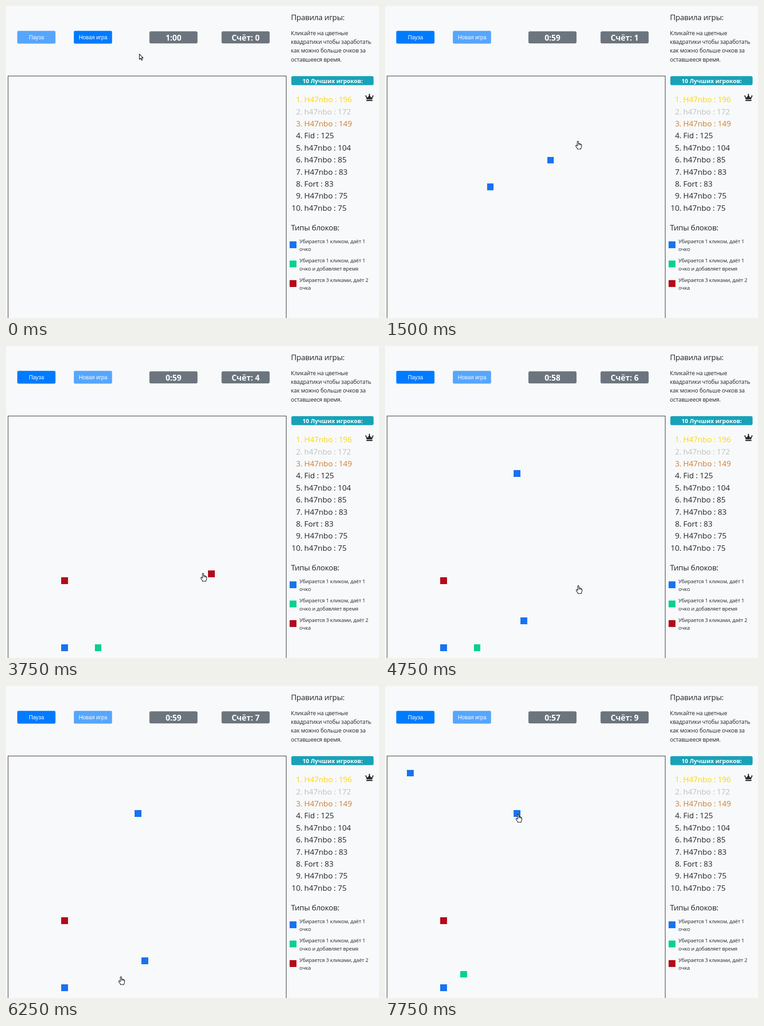
Recreate the animation shown at these times as an HTML page. Size 818x684 px, loop 8 s.

```html
<!DOCTYPE html>
<html lang="ru">
<head>
<meta charset="utf-8">
<title>Цветные квадратики</title>
<style>
  html, body { margin: 0; width: 100%; height: 100%; overflow: hidden; background: #f8f9fa; }
  svg { display: block; width: 818px; height: 684px; }
  text { font-family: "Open Sans", "Noto Sans", sans-serif; fill: #212529; white-space: pre; }
  .head { font-size: 16.8px; letter-spacing: -.015em; }
  .rules { font-size: 12.35px; letter-spacing: -.015em; }
  .note { font-size: 11.25px; letter-spacing: -.015em; }
  .rank { font-size: 17px; letter-spacing: -.005em; }
  .end { text-anchor: end; }
  .badge, .title { font-weight: 700; fill: #fff; text-anchor: middle; }
  .badge { font-size: 17.4px; }
  .title { font-size: 12.6px; }
  .btn { font: 12px "Liberation Sans", Arial, sans-serif; fill: #fff; text-anchor: middle; }
</style>
</head>
<body>
<svg id="stage" viewBox="0 0 818 684"></svg>
<script>
const LOOP = 8000, STEP = 250;
const BLUE = '#1872f0', GREEN = '#05d090', RED = '#b30a1b';
const stage = document.getElementById('stage');

function add(tag, attrs, parent = stage) {
  const el = document.createElementNS('http://www.w3.org/2000/svg', tag);
  for (const key in attrs) el.setAttribute(key, attrs[key]);
  return parent.appendChild(el);
}
function rect(x, y, width, height, fill, rx = 0, parent = stage) {
  return add('rect', { x, y, width, height, fill, rx }, parent);
}
function label(x, y, cls, str, parent = stage) {
  const el = add('text', { x, y, class: cls }, parent);
  el.textContent = str;
  return el;
}
function button(x, str) {
  const g = add('g');
  rect(x, 54.6, 83.8, 28, '#007bff', 3, g);
  label(x + 42.1, 72.6, 'btn', str, g);
  return g;
}
function badge(x) {
  rect(x, 55.5, 105.5, 26.5, '#6c757d', 3.5);
  return label(x + 52.8, 76, 'badge', '');
}

// Controls
const ring = rect(146.3, 52.2, 88.6, 32.8, 'rgba(0,123,255,.5)', 5);
rect(148.8, 54.6, 83.8, 28, '#f8f9fa', 3);
const pause = button(24.7, 'Пауза');
const start = button(148.8, 'Новая игра');
const timer = badge(314.5);
const score = badge(472.7);

// Side panel
label(625, 31, 'head', 'Правила игры:');
['Кликайте на цветные', 'квадратики чтобы заработать', 'как можно больше очков за', 'оставшееся время.']
  .forEach((line, i) => label(624.8, 63.6 + i * 19.4, 'rules', line));

rect(625.7, 153.8, 180.4, 19.6, '#17a2b8', 3.5);
label(716.3, 168.7, 'title', '10 Лучших игроков:');

const medals = ['#ffd700', '#c0c0c0', '#cd7f32'];
['H47nbo : 196', 'h47nbo : 172', 'H47nbo : 149', 'Fid : 125', 'h47nbo : 104',
 'h47nbo : 85', 'H47nbo : 83', 'Fort : 83', 'H47nbo : 75', 'h47nbo : 75'].forEach((line, i) => {
  const y = 211.4 + i * 26.35;
  const parts = [label(650, y, 'rank end', i + 1 + '.'), label(654, y, 'rank', line)];
  if (medals[i]) parts.forEach(el => el.style.fill = medals[i]);
});

const crown = add('g', { fill: '#212529' });
add('path', { d: 'M791 204.5 788.8 197.5 793.6 200.8 797 193.5 800.4 200.8 805.2 197.5 803 204.5Z' }, crown);
[[789.3, 197.4], [797, 193.8], [804.7, 197.4]].forEach(([cx, cy]) => add('circle', { cx, cy, r: 1.4 }, crown));
rect(790.3, 205.8, 13.4, 2.4, '#212529', .7, crown);

label(625, 492, 'head', 'Типы блоков:');
[[BLUE, 'Убирается 1 кликом, даёт 1', 'очко'],
 [GREEN, 'Убирается 1 кликом, даёт 1', 'очко и добавляет время'],
 [RED, 'Убирается 3 кликами, даёт 2', 'очка']].forEach(([color, a, b], i) => {
  const y = 515.7 + i * 42.4;
  rect(622, Math.round(y), 15, 15, color);
  label(643.5, y + 4, 'note', a);
  label(643.5, y + 21.6, 'note', b);
});

// Board
add('rect', { x: 4.5, y: 153.5, width: 610, height: 560, fill: 'none', stroke: '#1c1f22' });

// Grid cells snap to whole pixels
const colX = col => Math.round(4.2 + col * 14.64);
const rowY = row => Math.round(154.2 + row * 14.7);
function cell(col, row, color) {
  const x = colX(col), y = rowY(row);
  return rect(x, y, colX(col + 1) - x, rowY(row + 1) - y, color);
}

// column, row, colour, first step, step of removal
const blocks = [
  [28, 9, BLUE, 4, 6], [24, 12, BLUE, 4, 8], [15, 16, BLUE, 5, 10],
  [23, 23, GREEN, 8, 13], [8, 24, RED, 8, 32], [30, 23, RED, 13, 18],
  [8, 34, BLUE, 12, 32], [13, 34, GREEN, 14, 24], [19, 8, BLUE, 17, 32],
  [20, 30, BLUE, 19, 26], [3, 2, BLUE, 26, 32], [11, 32, GREEN, 27, 32],
  [37, 24, BLUE, 26, 30]
].map(([col, row, color, from, to]) => ({ el: cell(col, row, color), from, to }));

// [step, value] pairs, each held until the next
const times = [[0, '1:00'], [6, '0:59'], [9, '0:58'], [13, '0:59'], [18, '0:58'], [22, '0:57'],
               [24, '0:59'], [26, '0:58'], [30, '0:57']];
const scores = [[0, 0], [6, 1], [8, 2], [10, 3], [13, 4], [18, 6], [24, 7], [26, 8], [30, 9]];
const valueAt = (table, step) => table.filter(([from]) => from <= step).pop()[1];

// Pointer tip, one place per step
const tips = [
  [292, 105], [243, 88], [192, 70], [230, 128], [335, 215], [421, 293], [423, 296], [388, 330],
  [364, 341], [271, 388], [233, 399], [278, 440], [338, 490], [349, 501], [385, 505], [432, 498],
  [449, 501], [450, 501], [450, 501], [424, 525], [360, 580], [290, 628], [226, 658], [204, 663],
  [203, 663], [252, 637], [305, 605], [400, 570], [500, 535], [561, 515], [389, 354], [292, 281]
];
const ink = { fill: '#fff', stroke: '#000', 'stroke-width': 1.1, 'stroke-linejoin': 'round' };
const arrow = add('path', { ...ink, d: 'M.5.5V12L3.2 9.5 5.2 14 7.2 13.1 5.3 8.9H8.8Z' });
const hand = add('g');
add('path', { ...ink, d: 'M-1.3 11V1.8Q-1.2.4 0 .4T1.4 1.8V6Q1.6 5.1 2.7 5.3T3.9 6.6Q4.2 5.8 5.2 6.1T6.2 7.4Q7.9 6.7 8 8.8V12.3Q8 14.4 6.5 16V17.7H-1V16.3Q-2.8 14.4-4.6 11.2C-5.4 9.6-3.4 8.4-2.4 9.7Z' }, hand);
add('path', { ...ink, fill: 'none', 'stroke-width': .9, d: 'M1.4 6V9.3M3.9 6.6V9.3M6.2 7.4V9.6' }, hand);

const show = (el, on) => el.setAttribute('visibility', on ? 'visible' : 'hidden');

function draw(step) {
  const playing = step >= 3, [x, y] = tips[step];
  pause.setAttribute('opacity', playing ? 1 : .65);
  start.setAttribute('opacity', playing ? .65 : 1);
  show(ring, step >= 2 && step < 6);
  timer.textContent = valueAt(times, step);
  score.textContent = 'Счёт: ' + valueAt(scores, step);
  blocks.forEach(b => show(b.el, step >= b.from && step < b.to));
  const onButton = x > 149 && x < 232 && y > 55 && y < 83;
  const pointing = y > 153 || onButton;
  show(hand, pointing);
  show(arrow, !pointing);
  (pointing ? hand : arrow).setAttribute('transform', `translate(${x} ${y})`);
}

const t0 = performance.now();
function tick() {
  draw(Math.floor((performance.now() - t0) % LOOP / STEP));
  requestAnimationFrame(tick);
}
tick();
</script>
</body>
</html>
```
